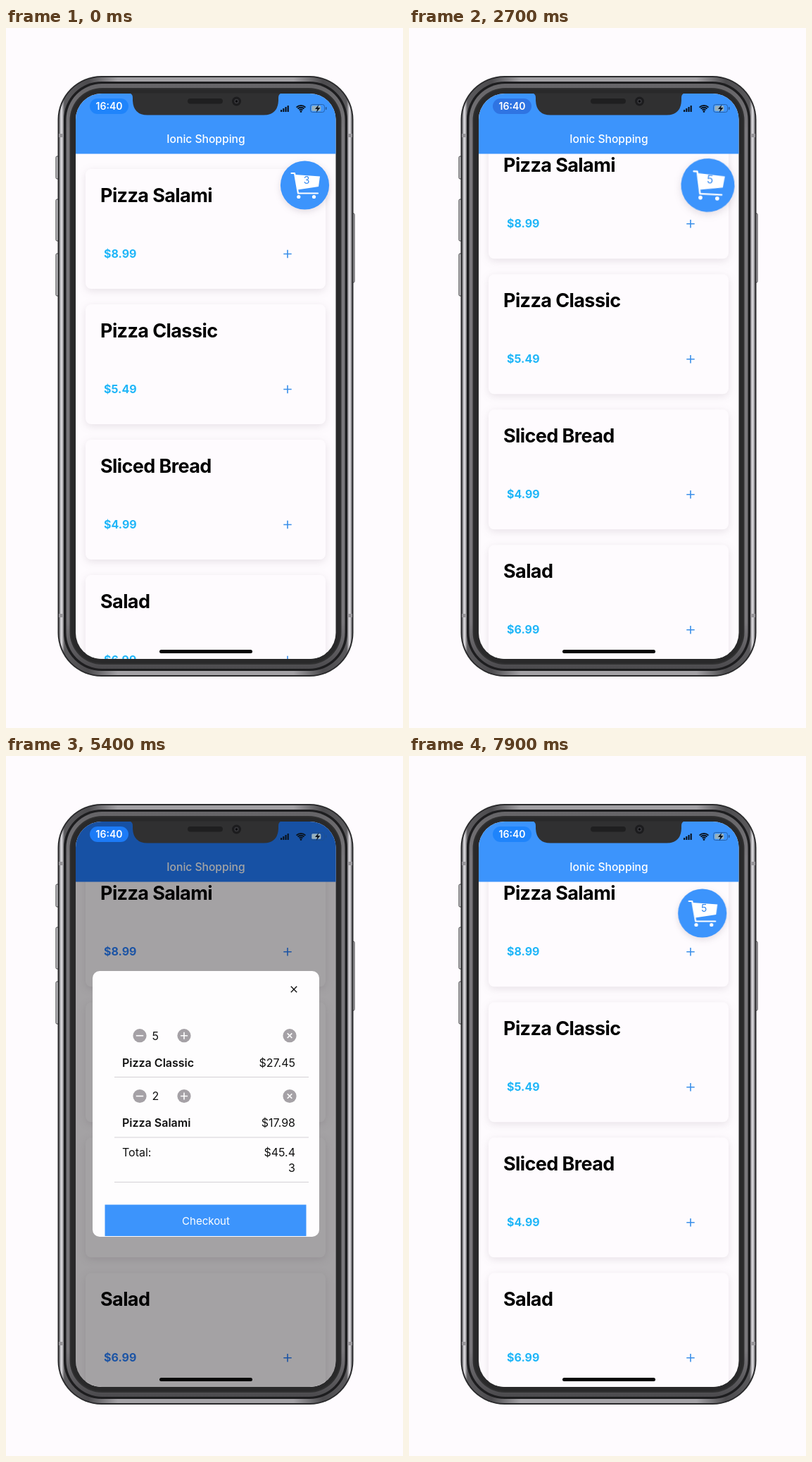
Write an HTML page that moves like this. It is 564 px wide and 993 px high and loops after 8 s.

```html
<!DOCTYPE html>
<html lang="en">
<head>
<meta charset="utf-8">
<title>Shopping cart</title>
<style>
html, body { margin: 0; width: 100%; height: 100%; overflow: hidden; background: #fefbfe; }
svg { display: block; width: 564px; height: 993px; font-family: Inter, Roboto, sans-serif; }

.card { filter: drop-shadow(0 3px 6px rgba(80, 55, 80, .13)); }
.title { font-size: 27px; font-weight: 700; letter-spacing: -.6px; }
.price { font-size: 16px; font-weight: 700; fill: #1fb6f8; animation: priceTint 8s linear infinite; }
.add { fill: none; stroke: #3b8fe9; stroke-width: 1.6; animation: addTint 8s linear infinite; }
.head, .disc { fill: #3c94fc; animation: headTint 8s linear infinite; }
.headText { font-size: 15.6px; font-weight: 500; fill: #fff; text-anchor: middle; }
.shade { opacity: 0; animation: shade 8s linear infinite; }
.pill { animation: pill 8s linear infinite; }
.clock { font-size: 14px; font-weight: 600; fill: #fff; text-anchor: middle; }

.list { animation: scroll 8s linear infinite; }
.cart { transform-origin: 424.5px 223px; animation: cart 8s ease infinite; }
.disc { filter: drop-shadow(0 3px 5px rgba(80, 55, 80, .16)); }
.count { font-size: 14px; fill: #3388f0; text-anchor: middle; }

.modal { transform: translateY(802px); animation: modal 8s linear infinite; font-size: 16px; fill: #111; }
.name { font-weight: 600; }
.end { text-anchor: end; }
.rule { stroke: #d4d1d5; }
.dot { fill: #a5a1a6; }
.mark { fill: none; stroke: #fff; stroke-width: 1.6; }
.checkout { font-size: 15px; fill: #fff; text-anchor: middle; }

.c3, .c4, .c5, .q3, .q4, .q5, .both, .single { animation: 8s step-end infinite; }
.c3 { animation-name: c3; }
.c4 { animation-name: c4; }
.c5 { animation-name: c5; }
.q3 { animation-name: q3; }
.q4 { animation-name: q4; }
.q5 { animation-name: q5; }
.both { animation-name: both; }
.single { animation-name: single; }

@keyframes c3 { 0% { opacity: 1 } 3.125%, 100% { opacity: 0 } }
@keyframes c4 { 0% { opacity: 0 } 3.125% { opacity: 1 } 25%, 100% { opacity: 0 } }
@keyframes c5 { 0% { opacity: 0 } 25%, 100% { opacity: 1 } }
@keyframes q3 { 0% { opacity: 1 } 60%, 100% { opacity: 0 } }
@keyframes q4 { 0% { opacity: 0 } 60% { opacity: 1 } 66.25%, 100% { opacity: 0 } }
@keyframes q5 { 0% { opacity: 0 } 66.25%, 100% { opacity: 1 } }
@keyframes both { 0% { opacity: 1 } 74.4%, 100% { opacity: 0 } }
@keyframes single { 0% { opacity: 0 } 74.4%, 100% { opacity: 1 } }

@keyframes scroll {
  0% { transform: translateY(0) }
  28.5% { transform: translateY(0); animation-timing-function: ease-out }
  33%, 100% { transform: translateY(-42.7px) }
}
/* wobble twice, leave to the left, bounce back in */
@keyframes cart {
  0%, 3.125%, 15.625%, 25%, 37.5%, 41.25% { transform: translateX(0) scale(1) rotate(0deg) }
  4.375%, 5.625%, 26.25%, 27.5% { transform: translateX(0) scale(.9) rotate(-3deg) }
  6.875%, 9.375%, 11.875%, 14.375%, 28.75%, 31.25%, 33.75%, 36.25% { transform: translateX(0) scale(1.1) rotate(3deg) }
  8.125%, 10.625%, 13.125%, 30%, 32.5%, 35% { transform: translateX(0) scale(1.1) rotate(-3deg) }
  42.5% { transform: translateX(10px) scale(1.09) rotate(0deg) }
  43.5% { transform: translateX(20px) scale(1) rotate(0deg) }
  51.5% { transform: translateX(-2000px) scale(1) rotate(0deg) }
  90% { transform: translateX(-3000px) scale(1) rotate(0deg); animation-timing-function: cubic-bezier(.215, .61, .355, 1) }
  97.6% { transform: translateX(25px) scale(1) rotate(0deg); animation-timing-function: cubic-bezier(.215, .61, .355, 1) }
  99.475% { transform: translateX(-10px) scale(1) rotate(0deg) }
  100% { transform: translateX(-1px) scale(1) rotate(0deg) }
}
@keyframes modal {
  0% { transform: translateY(802px) }
  41.215% { transform: translateY(802px); animation-timing-function: cubic-bezier(.32, .72, 0, 1) }
  47.465% { transform: translateY(0) }
  90.25% { transform: translateY(0); animation-timing-function: cubic-bezier(.32, .72, 0, 1) }
  96.5%, 100% { transform: translateY(802px) }
}
@keyframes shade {
  0%, 41.25% { opacity: 0 }
  42.5% { opacity: .12 }
  45%, 90.25% { opacity: .355 }
  94.5%, 100% { opacity: 0 }
}
@keyframes headTint {
  0%, 41.25% { fill: #3c94fc }
  42.5% { fill: #3485ff }
  45%, 90.25% { fill: #237dff }
  94.5%, 100% { fill: #3c94fc }
}
@keyframes priceTint {
  0%, 41.25% { fill: #1fb6f8 }
  45%, 90.25% { fill: #2b82ff }
  94.5%, 100% { fill: #1fb6f8 }
}
@keyframes addTint {
  0%, 41.25% { stroke: #3b8fe9 }
  45%, 90.25% { stroke: #2b82ff }
  94.5%, 100% { stroke: #3b8fe9 }
}
@keyframes pill {
  0%, 11.25% { fill: #1f84fb }
  30%, 33.75% { fill: #2f74e2 }
  42.5%, 52% { fill: #0f7dff }
  85% { fill: #2b79ee }
  98%, 100% { fill: #1f84fb }
}
</style>
</head>
<body>
<script>
const items = [['Pizza Salami', '$8.99'], ['Pizza Classic', '$5.49'], ['Sliced Bread', '$4.99'], ['Salad', '$6.99']];

const rect = (x, y, w, h, r, fill, more = '') =>
  `<rect x="${x}" y="${y}" width="${w}" height="${h}" rx="${r}" fill="${fill}" ${more}/>`;
const text = (x, y, cls, str) => `<text x="${x}" y="${y}" class="${cls}">${str}</text>`;
const path = (d, cls, more = '') => `<path d="${d}" class="${cls}" ${more}/>`;
const group = (cls, ...parts) => `<g class="${cls}">${parts.join('')}</g>`;
const rule = y => path(`M154 ${y}H430`, 'rule');

const plus = (x, y, r) => `M${x - r} ${y}h${2 * r}M${x} ${y - r}v${2 * r}`;
const minus = (x, y, r) => `M${x - r} ${y}h${2 * r}`;
const cross = (x, y, r) => `M${x - r} ${y - r}l${2 * r} ${2 * r}m0 ${-2 * r}l${-2 * r} ${2 * r}`;
const button = (x, y, shape, r) =>
  `<circle cx="${x}" cy="${y}" r="9.6" class="dot"/>` + path(shape(x, y, r), 'mark');

// body layers share one centre, each inset from the edge
const shell = (inset, top, r, fill) =>
  rect(73.5 + inset, 68 + top, 420 - 2 * inset, 852 - 2 * top, r, fill);

function phone() {
  const keys = [[71, 182, 32], [71, 243, 59], [71, 320, 60], [489.5, 263, 98]]
    .map(([x, y, h]) => rect(x, y, 5.5, h, 1.5, '#d0ced2', 'stroke="#353537"')).join('');
  const bands = [[75, 150], [484, 150], [75, 831], [484, 831]]
    .map(([x, y]) => rect(x, y, 8, 5, 0, '#98969a')).join('');
  return keys + shell(0, 0, 62, '#2a2a2c') + shell(2, 2, 60, 'url(#silver)') + bands +
    shell(8.5, 8, 54, '#1d1d1f') + shell(12, 11, 51, 'url(#steel)') +
    shell(17, 17, 46, '#303031') + shell(19, 19, 44, '#29292a');
}

function card([name, price], i) {
  const y = 200 + 192 * i;
  return rect(113, y, 341, 170, 8, '#fefbfe', 'class="card"') +
    text(134, y + 47, 'title', name) + text(139, y + 126, 'price', price) +
    path(plus(400, y + 120.5, 5.7), 'add');
}

function cart() {
  return group('cart',
    '<circle cx="424.5" cy="223" r="34.6" class="disc"/>',
    path('M405.5 206H410L415 234.5H443', '', 'fill="none" stroke="#fff" stroke-width="2.2" stroke-linecap="round" stroke-linejoin="round"'),
    path('M410.5 208L446 210.5L444 225L414 229.5Z', '', 'fill="#fff"'),
    '<circle cx="415.8" cy="239.5" r="2.6" fill="#fff"/><circle cx="437.5" cy="239.5" r="2.6" fill="#fff"/>',
    ...[3, 4, 5].map(n => text(427, 220.5, `count c${n}`, n)));
}

const controls = y => button(190, y, minus, 5.2) + button(253, y, plus, 5) + button(403, y, cross, 3.3);
const checkout = y => rect(140.5, y, 286, 44.5, 0, '#3c94fc') + text(284, y + 28, 'checkout', 'Checkout');

function modal() {
  // quantity, row sum, and the total broken over two lines
  const amounts = [[3, '$16.47', '$34.4', 5], [4, '$21.96', '$39.9', 4], [5, '$27.45', '$45.4', 3]];
  return group('modal',
    rect(123, 305, 322, 377, 10, '#fefdfe'),
    path(cross(409, 331, 4.2), '', 'fill="none" stroke="#111" stroke-width="1.4"'),
    controls(396.7),
    text(165, 440.8, 'name', 'Pizza Classic'),
    ...amounts.map(([n, sum]) => group(`q${n}`, text(207.5, 402.8, '', n), text(411, 440.8, 'end', sum))),
    rule(455.5),
    group('both',
      controls(482.5),
      text(207.5, 488.3, '', 2),
      text(165, 526.3, 'name', 'Pizza Salami'), text(411, 526.3, 'end', '$17.98'),
      rule(541), text(165, 567.8, '', 'Total:'),
      ...amounts.map(([n, , total, rest]) =>
        group(`q${n}`, text(411, 567.8, 'end', total), text(411, 589.5, 'end', rest))),
      rule(604.5), checkout(636.5)),
    group('single',
      text(165, 483.3, '', 'Total:'), text(411, 483.3, 'end', '$27.45'),
      rule(498.8), checkout(531)));
}

function statusBar() {
  const bars = [0, 1, 2, 3].map(i => rect(390 + 3.2 * i, 116 - 2 * i, 2.2, 3 + 2 * i, .5, '#0a1420')).join('');
  const arcs = [3.4, 6.4, 9.2].map(r => {
    const d = r * .7;
    return path(`M${419 - d} ${119 - d}A${r} ${r} 0 0 1 ${419 + d} ${119 - d}`, '', 'fill="none" stroke="#0a1420" stroke-width="1.9"');
  }).join('');
  return rect(119, 100, 55, 22, 11, '#1f84fb', 'class="pill"') + text(146.5, 116, 'clock', '16:40') +
    bars + arcs + '<circle cx="419" cy="118.6" r="1.4" fill="#0a1420"/>' +
    rect(432.5, 108.5, 20, 11, 3, 'none', 'stroke="#20508c" stroke-opacity=".7"') +
    rect(434.3, 110.2, 13, 7.6, 1.5, '#98b2bf') + rect(454, 112, 1.4, 4, .7, '#20508c') +
    path('M444.5 108.5L439 115H442.3L440.8 120L446.5 113H443Z', '', 'fill="#0a1420"');
}

function notch() {
  return path('M175 92.5Q180 93 180 99V103Q181 123.5 201 123.5H366Q386 123.5 387 103V99Q387 93 392 92.5Z', '', 'fill="#303031"') +
    rect(258, 100, 50, 7.5, 3.7, '#1f1f20') +
    '<circle cx="327.5" cy="104" r="6.5" fill="#1c1c1e"/><circle cx="327.5" cy="104" r="3.2" fill="#38383c"/><circle cx="327.5" cy="104" r="1.7" fill="#0c0c0f"/>';
}

document.body.innerHTML = `<svg viewBox="0 0 564 993">
<defs>
  <clipPath id="screen">${rect(99, 93, 369.5, 802, 37, '#000')}</clipPath>
  <linearGradient id="silver">
    <stop offset="0" stop-color="#77767a"/><stop offset=".008" stop-color="#e4e2e6"/>
    <stop offset=".018" stop-color="#5a595c"/><stop offset=".1" stop-color="#4c4b4e"/>
    <stop offset=".2" stop-color="#a3a1a5"/><stop offset=".8" stop-color="#a3a1a5"/>
    <stop offset=".9" stop-color="#4c4b4e"/><stop offset=".982" stop-color="#5a595c"/>
    <stop offset=".992" stop-color="#e4e2e6"/><stop offset="1" stop-color="#77767a"/>
  </linearGradient>
  <linearGradient id="steel" x2="0" y2="1">
    <stop offset="0" stop-color="#656467"/><stop offset=".08" stop-color="#79777b"/>
    <stop offset=".92" stop-color="#79777b"/><stop offset="1" stop-color="#4b4a4d"/>
  </linearGradient>
</defs>
${phone()}
<g clip-path="url(#screen)">
  ${rect(99, 93, 370, 802, 0, '#fefbfe')}
  ${group('list', ...items.map(card))}
  ${rect(99, 93, 370, 85.5, 0, '#3c94fc', 'class="head"')}
  ${text(284, 163, 'headText', 'Ionic Shopping')}
  ${cart()}
  ${rect(99, 93, 370, 802, 0, '#000', 'class="shade"')}
  ${modal()}
  ${statusBar()}
  ${rect(218, 882, 132, 5, 2.5, '#050505')}
</g>
${notch()}
</svg>`;
</script>
</body>
</html>
```
